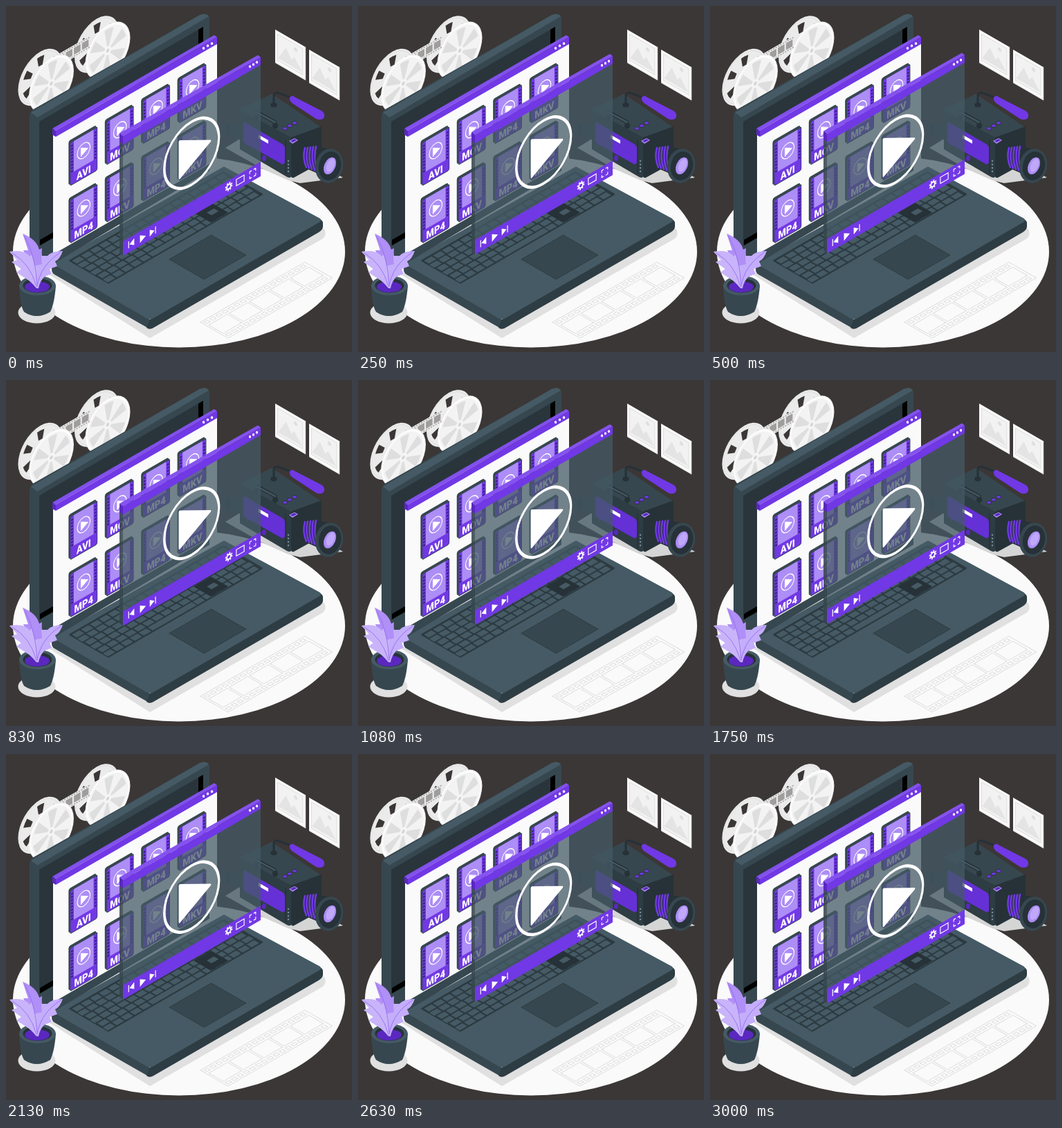
An HTML page that plays this animation: 500x500 px, repeating every 3.04 s.

```html
<!DOCTYPE html>
<html lang="en">
<head>
<meta charset="utf-8">
<title>Video formats</title>
<style>
html, body { margin: 0; width: 100%; height: 100%; overflow: hidden; background: #3b3736; }
svg { display: block; width: 100%; height: 100%; }
text { font: 800 15px Roboto, "Open Sans", sans-serif; font-stretch: 75%; fill: #fff; text-anchor: middle; }
</style>
</head>
<body>
<svg id="stage" viewBox="0 0 500 500"></svg>
<script>
const BG = '#3b3736', SLATE = '#455a64', DARK = '#37474f', INK = '#263238';
const PURPLE = '#7138e5', DEEP = '#5a28bf', LILAC = '#ad8df6', WHITE = '#fafafa', GREY = '#e0e0e0';
const PERIOD = 3040, LIFT = 10;

// Isometric planes: wall rising right, wall falling right, floor.
const plane = m => (x, y, body) => `<g transform="matrix(${m} ${x} ${y})">${body}</g>`;
const wallUp = plane('.866 -.5 0 1');
const wallDown = plane('.866 .5 0 1');
const floor = plane('.866 -.5 .866 .5');

const path = (d, fill, more = '') => `<path d="${d}" fill="${fill}" ${more}/>`;
const line = (d, color, width = 1) => path(d, 'none', `stroke="${color}" stroke-width="${width}" stroke-linecap="round" stroke-linejoin="round"`);
const poly = (points, fill, more = '') => `<polygon points="${points}" fill="${fill}" ${more}/>`;
const rect = (x, y, w, h, fill, more = '') => `<rect x="${x}" y="${y}" width="${w}" height="${h}" fill="${fill}" ${more}/>`;
const ellipse = (x, y, rx, ry, fill, more = '') => `<ellipse cx="${x}" cy="${y}" rx="${rx}" ry="${ry}" fill="${fill}" ${more}/>`;
const circle = (x, y, r, fill, more) => ellipse(x, y, r, r, fill, more);
const repeat = (n, draw) => Array.from({ length: n }, (_, i) => draw(i)).join('');

function wedges(count, inner, outer, fill, spread) {
  const at = (r, a) => `${(r * Math.cos(a)).toFixed(2)} ${(r * Math.sin(a)).toFixed(2)}`;
  return repeat(count, i => {
    const a = i * 2 * Math.PI / count + .35, b = a + spread;
    return path(`M${at(inner, a)}L${at(outer, a)}A${outer} ${outer} 0 0 1 ${at(outer, b)}L${at(inner, b)}Z`, fill);
  });
}

function reel(x, y) {
  const back = circle(0, 0, 37, '#ebebeb') + circle(0, 0, 34.5, 'none', `stroke="${GREY}"`)
    + wedges(6, 17, 30, BG, .4);
  const core = circle(0, 0, 26, '#d6d6d6');
  const front = circle(0, 0, 37.5, '#f3f3f3') + circle(0, 0, 35, 'none', 'stroke="#fff" stroke-width="2"')
    + wedges(6, 6, 31, '#dedede', .5) + circle(0, 0, 6, '#f5f5f5')
    + circle(0, 0, 2.5, '#d4d4d4');
  return wallUp(x - 16, y - 9, back) + wallUp(x - 7, y - 4, core) + wallUp(x, y, front);
}

function projector() {
  const film = rect(0, 0, 56, 18, '#ebebeb')
    + repeat(4, i => rect(2 + i * 13.5, 4, 11, 10, '#a09e9d'))
    + repeat(14, i => rect(1 + i * 4, 1.2, 2, 1.4, '#858382') + rect(1 + i * 4, 15.4, 2, 1.4, '#858382'));
  return reel(147, 64.5) + wallUp(73, 71, film) + reel(65.5, 112);
}

function picture(x, y) {
  return wallDown(x, y, rect(0, 0, 51, 48, WHITE)
    + rect(4, 4.5, 42, 38, '#f2f2f2', 'stroke="#dcdcdc"')
    + circle(34, 12, 3, GREY)
    + path('M5 39L18 17L27 30L32 24L45 39Z', '#e4e4e4')
    + line('M50 .5V47.5H.8', GREY, 1.2));
}

function floorFilm() {
  const outline = 'stroke="#dedede" stroke-width="1.2"';
  return floor(281, 457, rect(0, 0, 174, 46, 'none', outline)
    + repeat(5, i => rect(3 + i * 34, 11, 31, 24, 'none', outline))
    + repeat(17, i => rect(3 + i * 10, 3, 6, 4.5, 'none', outline)
      + rect(3 + i * 10, 38.5, 6, 4.5, 'none', outline)));
}

function laptopBase() {
  const keys = repeat(6, row => repeat(17, col =>
    rect(3 + col * 15 - (row % 2) * 1.5, 3 + row * 10.6, 12.6, 8.4, SLATE, 'rx="1"')));
  return path('M62 388L208 480L458 336Q464 331 460 322L300 310Z', GREY)
    + path('M66 370L208 453V467L70 388Q66 386 66 380Z', DARK)
    + path('M208 453L450 306Q458 309 458 314V319Q458 323 452 327L213 465Q208 468 203 465Z', '#2e3c43')
    + path('M66 372L315 232L450 305Q459 309 452 313L215 450Q208 455 201 450Z', SLATE)
    + floor(90, 368, rect(0, 0, 259, 67, '#2c3a41', 'rx="2"') + keys
      + rect(80, 56, 70, 8.4, SLATE, 'rx="1"')
      + rect(174, 35, 29, 29, INK) + rect(185, 46, 12, 8, SLATE, 'rx="1"'))
    + floor(236, 366, rect(0, 0, 70, 58, DARK, 'stroke="#2e3c43"'));
}

function lid() {
  return path('M34 159Q34 153 40 149L280 13Q291 9 294 17V238L66 374L62 376L37 361Q34 359 34 354Z', DARK)
    + path('M36 154L280 13Q289 9 293 15L47 160Q44 162 43 159Z', SLATE)
    + poly('48,167 285,30 285,210 48,347', '#29353b')
    + poly('278,34 285,30 285,52 278,55', '#000')
    + poly('49,338 68,327 68,335 49,346', '#000');
}

function fileIcon(x, y, label) {
  const holes = repeat(9, i => rect(-21, -18 + i * 4.6, 3, 2.4, '#35217a') + rect(18, -18 + i * 4.6, 3, 2.4, '#35217a'));
  const card = rect(-23, -24, 46, 64, DARK, 'rx="3"');
  return wallUp(x - 2, y - 1.5, card) + wallUp(x, y, card
    + rect(-22, -22, 44, 61, PURPLE, 'rx="2"')
    + rect(-16.5, -22, 33, 44, LILAC) + holes
    + circle(0, 0, 10.6, 'none', 'stroke="#fff" stroke-width="1.3"')
    + path('M-4.5-6L7 0L-4.5 6Z', '#fff', 'stroke="#fff" stroke-linejoin="round"')
    + `<text y="37">${label}</text>`);
}

function browser() {
  const labels = ['AVI', 'MOV', 'MP4', 'MKV', 'MP4', 'MKV', 'MP4', 'MKV'];
  return poly('68,180 305,47 305,222 68,359', WHITE)
    + poly('67,177 72,180 72,189 67,186', DEEP)
    + poly('67,177 301,42 305,45 72,180', '#8350ec')
    + poly('72,180 305,45 305,55 72,189', PURPLE)
    + repeat(3, i => ellipse(285.5 + i * 6, 61 - i * 3.4, 1.7, 2, '#fff'))
    + labels.map((label, i) => fileIcon(112.3 + i % 4 * 52.4, 209 - i % 4 * 30.2 + (i > 3 ? 83 : 0), label)).join('');
}

function camera() {
  const shadow = poly('317,205 338,192 440,222 487,248 425,256 408,252 372,236', '#d5d5d5');
  const rear = ellipse(323, 179, 6, 10, INK) + poly('323,169 342,172 342,194 323,189', '#2e3c43');
  const body = path('M338 150L384 127L455 175L412 193Z', DARK)
    + path('M338 150L412 190V247Q410 249 406 247L338 207Z', '#2e3c43')
    + path('M412 190L456 174V226L416 248Q412 249 412 245Z', INK)
    + path('M345 168L400 200Q403 202 403 206V226Q402 230 398 228L346 199Q343 197 343 193V170Z', '#6530d6')
    + poly('365,186 379,194 379,199 365,191', '#fff')
    + line('M404 194V243', INK, 1.5)
    + repeat(4, i => circle(408, 224 + i * 5, 1.2, '#78909c'))
    + poly('409,195 417,191 422,194 414,199', LILAC) + poly('411,195 417,192 420,194 414,197', DEEP)
    + repeat(3, i => ellipse(403 + i * 7, 177 - i * 4, 3.5, 2.3, PURPLE, 'stroke="#263238"'))
    + ellipse(373, 220, 3, 4, DEEP);
  const handle = line('M362 163V153L389 168V175', INK, 5) + line('M361 153L389 168', SLATE, 2)
    + circle(360, 154, 3.5, DARK) + circle(389, 173, 4, INK)
    + line('M387 144V131Q387 125 392 125L411 132', INK, 3)
    + ellipse(387, 143, 5, 3.5, INK)
    + path('M410 132Q413 128 418 132L457 152Q462 157 459 162Q455 166 448 163L413 140Q409 136 410 132Z', PURPLE);
  const lens = path('M431 204Q425 216 432 234L455 244V200L440 199Z', INK)
    + repeat(5, i => line(`M${432 + i * 4} ${205 - i * .5}Q${428 + i * 4} 219 ${434 + i * 4} ${233 + i * 1.4}`, PURPLE, 2.6))
    + path('M451 203Q443 222 453 246L468 256V207Z', INK)
    + ellipse(467, 231, 20, 25, DARK, 'transform="rotate(12 467 231)"')
    + ellipse(468, 231, 16, 21, INK, 'transform="rotate(12 468 231)"')
    + ellipse(468, 231, 8, 13, LILAC, 'transform="rotate(24 468 231)"')
    + ellipse(469, 230, 5.5, 10, '#c0a8f9', 'transform="rotate(24 469 230)"');
  return shadow + rear + body + handle + lens;
}

function plant() {
  return ellipse(44.5, 443, 27, 15.5, GREY)
    + path('M19 404Q20 432 26 442Q44 454 64 442Q70 430 72 404Z', DARK)
    + ellipse(45.5, 404, 26.5, 14, SLATE) + ellipse(45.5, 404, 21, 10.5, INK)
    + ellipse(45, 406, 18, 8, DEEP)
    + path('M46 405Q31 377 31 366L25 353L32 353L24 329Q44 337 48 352L52 350Q51 362 54 367L57 367Q49 384 47 405Z', '#b08ff6')
    + path('M44 408Q36 398 29 394L15 385L22 380L8 370L16 367L5 355Q27 351 34 362L37 359Q40 370 42 376L46 374Q45 390 47 406Z', '#c9b4fa')
    + path('M45 408Q43 391 46 383L44 375L52 373L51 361L60 361Q66 354 82 354Q78 366 71 369L74 376L63 380L66 387L56 391Q49 397 47 408Z', '#c4adfa')
    + line('M27 333Q43 362 45 402M9 357Q35 372 44 405M79 356Q50 374 45 405', '#946ef0', .9);
}

function player() {
  const glass = poly('169,199 368,84 368,226 169,341', SLATE, 'opacity=".75"')
    + poly('164,184 169,188 169,361 164,357', DARK, 'opacity=".88"');
  const bars = poly('164,184 364,71 368,74 169,188', '#8552ee')
    + poly('164,184 169,188 169,200 164,196', DEEP)
    + poly('169,188 368,74 368,85 169,200', PURPLE)
    + poly('169,340 368,225 368,246 169,361', PURPLE)
    + repeat(3, i => ellipse(352.5 + i * 5, 87.5 - i * 3.1, 1.6, 2, '#fff'));
  const bigPlay = wallUp(268.2, 212.7, circle(0, 0, 45.5, 'none', 'stroke="#fff" stroke-width="4"')
    + path('M-20-27L31-2L-20 26Z', '#fff', 'stroke="#fff" stroke-width="3" stroke-linejoin="round"'));
  const controls = wallUp(181, 343, path('M5-5V5L-3 0Z', '#fff') + rect(-5, -5, 1.4, 10, '#fff'))
    + wallUp(197, 335, path('M-4-5.5L6 0L-4 5.5Z', '#fff'))
    + wallUp(212, 326, path('M-5-5V5L3 0Z', '#fff') + rect(4, -5, 1.4, 10, '#fff'))
    + wallUp(322, 261, circle(0, 0, 3.4, 'none', 'stroke="#fff" stroke-width="2.2"')
      + circle(0, 0, 5.2, 'none', 'stroke="#fff" stroke-width="2" stroke-dasharray="2.04"'))
    + wallUp(338.5, 252, rect(-6.5, -4.5, 13, 9, 'none', 'stroke="#fff" stroke-width="1.3"'))
    + wallUp(356.5, 242, line('M-5-2V-5H-2M2-5H5V-2M5 2V5H2M-2 5H-5V2', '#fff', 1.3));
  return glass + bars + bigPlay + controls;
}

document.getElementById('stage').innerHTML = rect(0, 0, 500, 500, BG)
  + ellipse(250, 355, 240, 138.5, WHITE)
  + floorFilm() + projector() + picture(389, 34) + picture(438, 63)
  + camera() + laptopBase() + lid() + browser() + plant()
  + `<g id="player">${player()}</g>`;

const panel = document.getElementById('player');
const start = performance.now();

function render(now) {
  const phase = Math.max(0, now - start) % PERIOD / PERIOD;
  const rise = LIFT * (1 - Math.abs(1 - 2 * phase));
  panel.setAttribute('transform', `translate(0 ${-rise.toFixed(3)})`);
  requestAnimationFrame(render);
}
render(start);
</script>
</body>
</html>
```
